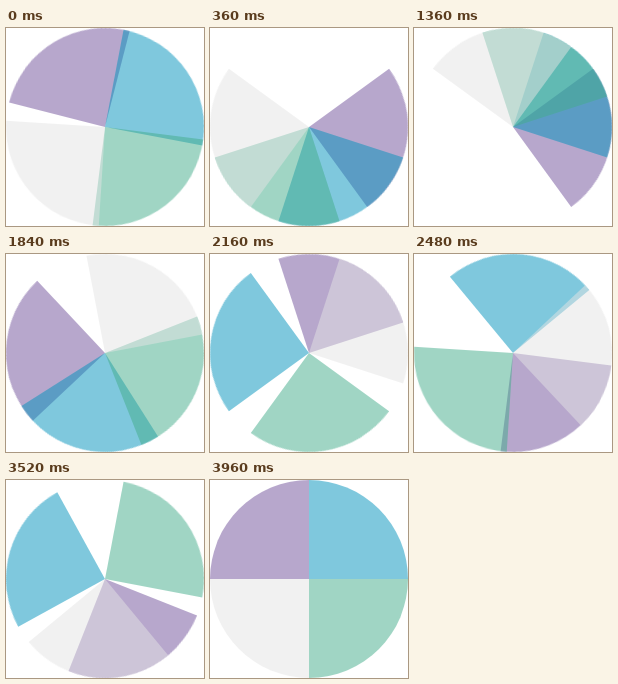
An HTML page for the animation above (4 s loop, 198 by 198 pixels).

```html
<!DOCTYPE html>
<html lang="en">
<head>
<meta charset="utf-8">
<title>Turning quarters</title>
<style>
  html, body { margin: 0; width: 100%; height: 100%; overflow: hidden; background: #fff; }
  svg { display: block; width: 100%; height: 100%; }
  path { fill-opacity: .5; transform-origin: 99px 99px; }
</style>
</head>
<body>
<svg viewBox="0 0 198 198"></svg>
<script>
  const LOOP = 4000;
  const STEPS = 100;

  // Bottom to top: colour, resting angle in degrees, turns per loop
  const quarters = [
    ['rgb(113, 81, 153)', 270, 4],
    ['rgb(0, 145, 187)', 0, 3],
    ['rgb(67, 171, 137)', 90, 2],
    ['rgb(227, 227, 227)', 180, 1],
  ];

  const svg = document.querySelector('svg');
  const turn = angle => ({ transform: `rotate(${angle}deg)` });

  for (const [color, rest, turns] of quarters) {
    const path = document.createElementNS('http://www.w3.org/2000/svg', 'path');
    path.setAttribute('d', 'M99 99V0A99 99 0 0 1 198 99Z');
    path.setAttribute('fill', color);
    svg.append(path);
    path.animate([turn(rest), turn(rest + 360 * turns)], {
      duration: LOOP,
      delay: -1, // keeps rounding from holding a step too long
      iterations: Infinity,
      easing: `steps(${STEPS}, jump-start)`,
    });
  }
</script>
</body>
</html>
```
